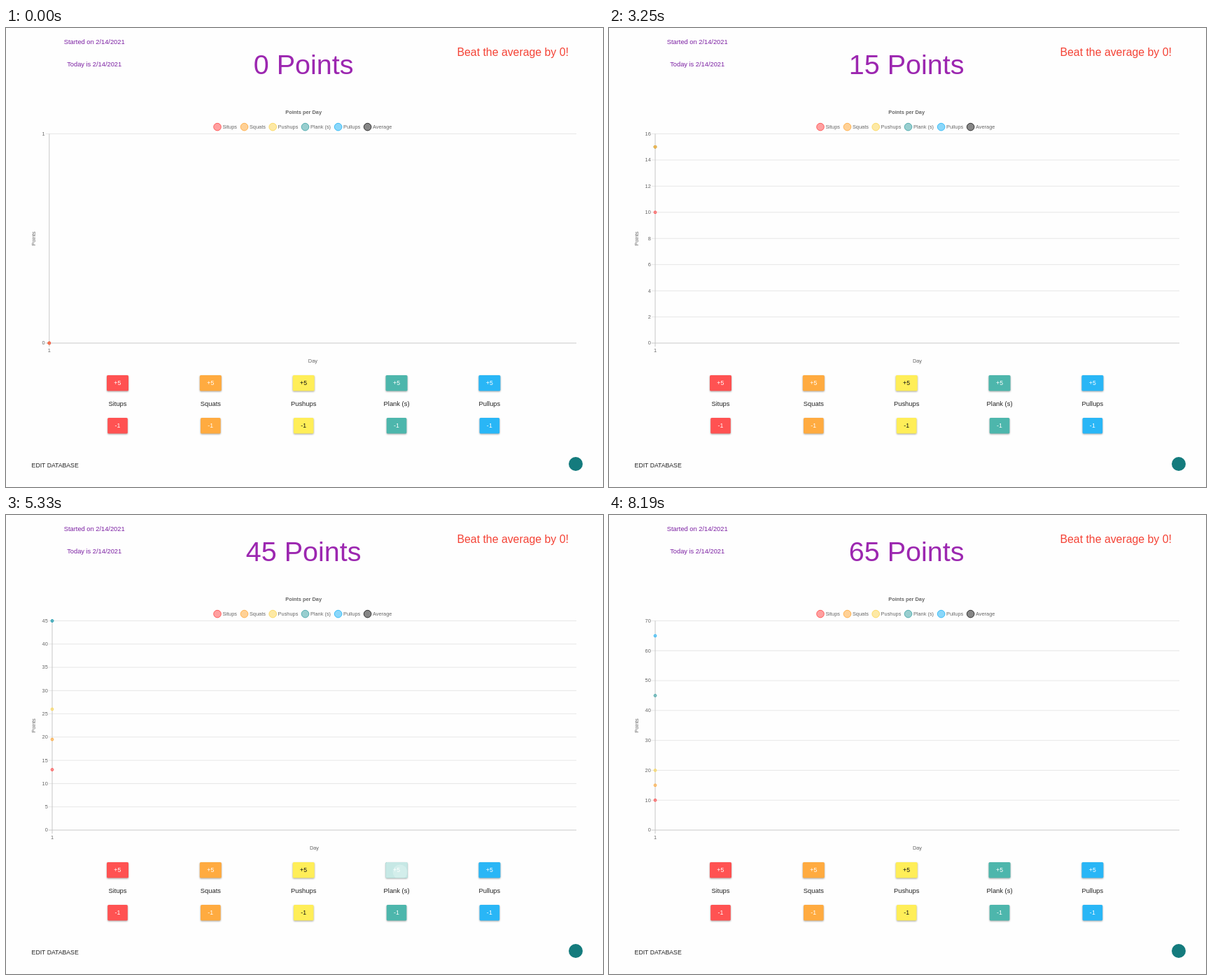
Animation, 853 px wide and 657 px high, one loop 8580 ms. Source, as an HTML page:

```html
<!DOCTYPE html>
<html lang="en">
<head>
<meta charset="utf-8">
<title>Points per Day</title>
<style>
  html, body { margin: 0; width: 100%; height: 100%; overflow: hidden; background: #fefefe; }
  svg { display: block; width: 100vw; height: 100vh; font-family: "Liberation Sans", Arial, sans-serif; }
  .chart { font-size: 7.4px; fill: #666; }
  .button { filter: drop-shadow(0 1px 1px rgba(0, 0, 0, .36)); }
</style>
</head>
<body>
<svg id="stage" viewBox="0 0 853 657"></svg>
<script>
const LOOP = 8580, TICK = 130;
// Ticks at which the screen refreshes; the picture holds in between.
const REFRESH = [0, 5, 7, 9, 11, 13, 14, 15, 16, 18, 19, 21, 22, 24, 25, 26, 27, 28, 29, 30,
  32, 33, 36, 37, 38, 39, 40, 41, 42, 43, 44, 45, 47, 48, 50, 52, 54, 56, 58, 60, 61, 63];

const SERIES = [
  { name: 'Situps', color: '#ff5252', ink: '#fff', legendX: 302 },
  { name: 'Squats', color: '#ffab40', ink: '#fff', legendX: 340.5 },
  { name: 'Pushups', color: '#ffee58', ink: '#111', legendX: 381.2, plot: '#fbd75b' },
  { name: 'Plank (s)', color: '#4db6ac', ink: '#fff', legendX: 427.5, plot: '#43a5a8' },
  { name: 'Pullups', color: '#29b6f6', ink: '#fff', legendX: 474.6 }
];
// [time, series] of every press on a +5 button
const CLICKS = [[600, 0], [1760, 0], [2300, 1], [3490, 2],
  [4745, 3], [4875, 3], [5005, 3], [5135, 3], [5265, 3],
  [6200, 4], [6590, 4], [6630, 4], [6950, 4]];
const TOP = 151.5, BOTTOM = 451, RIGHT = 815;

const stage = document.getElementById('stage');

function add(parent, tag, attrs, text) {
  const node = document.createElementNS('http://www.w3.org/2000/svg', tag);
  for (const key in attrs) node.setAttribute(key, attrs[key]);
  if (text !== undefined) node.textContent = text;
  parent.appendChild(node);
  return node;
}
const set = (node, attrs) => { for (const key in attrs) node.setAttribute(key, attrs[key]); };

function label(text, x, y, size, fill, anchor = 'middle', extra = {}) {
  return add(stage, 'text', { x, y, 'font-size': size, fill, 'text-anchor': anchor, ...extra }, text);
}

function chartText(parent, text, x, y, extra = {}) {
  return add(parent, 'text', { x, y, class: 'chart', 'text-anchor': 'middle', ...extra }, text);
}

// Header
label('Started on 2/14/2021', 126.2, 23, 9.3, '#7b1fa2');
label('Today is 2/14/2021', 126.2, 55.2, 9.3, '#7b1fa2');
const heading = label('0 Points', 425.2, 65.6, 39.5, '#9c27b0');
label('Beat the average by 0!', 724.2, 40, 15.85, '#f44336');

// Chart
chartText(stage, 'Points per Day', 425.2, 123, { 'font-weight': 'bold' });
function legend(name, x, color) {
  add(stage, 'circle', { cx: x, cy: 141.6, r: 5.3, fill: color, 'fill-opacity': .55, stroke: color, 'stroke-width': .9 });
  chartText(stage, name, x + 7.4, 144, { 'text-anchor': 'start' });
}
SERIES.forEach(s => legend(s.name, s.legendX, s.plot || s.color));
legend('Average', 516.6, '#222');
chartText(stage, 'Points', 0, 0, { transform: 'translate(42.4 301.5) rotate(-90)' });

const grid = add(stage, 'g', {});
const dots = SERIES.map(() => null);
for (let i = SERIES.length - 1; i >= 0; i--) {
  const color = SERIES[i].plot || SERIES[i].color;
  dots[i] = add(stage, 'circle', { r: 1.9, fill: color, 'fill-opacity': .55, stroke: color, 'stroke-width': .9 });
}

// Buttons
const ripples = [];
function button(s, text, cx, y, width) {
  const box = { x: cx - width / 2, y, width, height: 22.6, rx: 1.6 };
  add(stage, 'rect', { ...box, fill: s.color, class: 'button' });
  const clip = add(stage, 'clipPath', { id: 'clip' + stage.childNodes.length });
  add(clip, 'rect', box);
  const layer = add(stage, 'g', { 'clip-path': `url(#${clip.id})` });
  label(text, cx, y + 14.3, 8.7, s.ink, 'middle', { 'letter-spacing': .2 });
  return layer;
}
SERIES.forEach((s, i) => {
  const cx = 159.5 + 132.85 * i;
  const layer = button(s, '+5', cx, 497, 31);
  label(s.name, cx, 541.2, 9.4, '#222');
  button(s, '-1', cx, 558, 28.6);
  for (const [time, index] of CLICKS) {
    if (index === i) ripples.push({ time, node: add(layer, 'circle', { cx: cx + 5, cy: 511, fill: s.ink }) });
  }
});

// Footer
label('EDIT DATABASE', 36.6, 628.8, 8.7, '#222', 'start');
add(stage, 'circle', { cx: 814, cy: 624, r: 10, fill: '#147b7d' });

const easeOutQuart = u => 1 - (1 - Math.min(1, u)) ** 4;

function axisStep(total) {
  const raw = total / 10, unit = 10 ** Math.floor(Math.log10(raw || 1));
  return Math.max(1, [1, 2, 5, 10].find(n => n * unit >= raw - 1e-9) * unit);
}

function axisFor(total) {
  const step = axisStep(total);
  return { step, max: Math.max(1, Math.ceil(total / step) * step) };
}

function stackHeights(counts) {
  const { max } = axisFor(counts.reduce((a, b) => a + b));
  let sum = 0;
  return counts.map(n => BOTTOM - (BOTTOM - TOP) * (sum += n) / max);
}

// Every press restarts the one-second easing from wherever the dots are.
function chartAt(time) {
  const counts = SERIES.map(() => 0);
  let from = stackHeights(counts), target = from, start = 0;
  const at = t => from.map((y, i) => y + (target[i] - y) * easeOutQuart((t - start) / 1000));
  for (const [when, index] of CLICKS) {
    if (when > time) break;
    from = at(when);
    start = when;
    counts[index] += 5;
    target = stackHeights(counts);
  }
  return { total: counts.reduce((a, b) => a + b), heights: at(time) };
}

let shownTotal = -1, left = 62;
function drawAxes(total) {
  const { step, max } = axisFor(total);
  const line = (x1, y1, x2, y2, stroke) => add(grid, 'line', { x1, y1, x2, y2, stroke, 'stroke-width': .9 });
  left = max > 9 ? 66 : 61.8;
  grid.replaceChildren();
  for (let value = 0; value <= max; value += step) {
    const y = BOTTOM - (BOTTOM - TOP) * value / max;
    line(left - 5, y, RIGHT, y, value ? '#e5e5e5' : '#c2c2c2');
    chartText(grid, value, left - 6.2, y + 2.4, { 'text-anchor': 'end' });
  }
  line(left, TOP, left, BOTTOM + 5, '#c2c2c2');
  chartText(grid, '1', left, 464);
  chartText(grid, 'Day', (left + RIGHT) / 2, 479);
}

function draw(time) {
  const { total, heights } = chartAt(time);
  if (total !== shownTotal) {
    shownTotal = total;
    heading.textContent = total + ' Points';
    drawAxes(total);
  }
  dots.forEach((dot, i) => set(dot, { cx: left, cy: heights[i] }));
  for (const { time: start, node } of ripples) {
    const age = time - start;
    const grow = Math.min(1, Math.max(0, age / 300));
    const fade = Math.min(1, Math.max(0, 1 - (age - 220) / 380));
    set(node, { r: 27 * (1 - (1 - grow) ** 2), opacity: .43 * Math.min(1, Math.max(0, age / 120)) * fade });
  }
}

const origin = performance.now();
let shownTick = -1;
function frame() {
  const now = (performance.now() - origin) % LOOP;
  const tick = REFRESH.findLast(t => t * TICK <= now);
  if (tick !== shownTick) draw((shownTick = tick) * TICK);
  requestAnimationFrame(frame);
}
frame();
</script>
</body>
</html>
```
